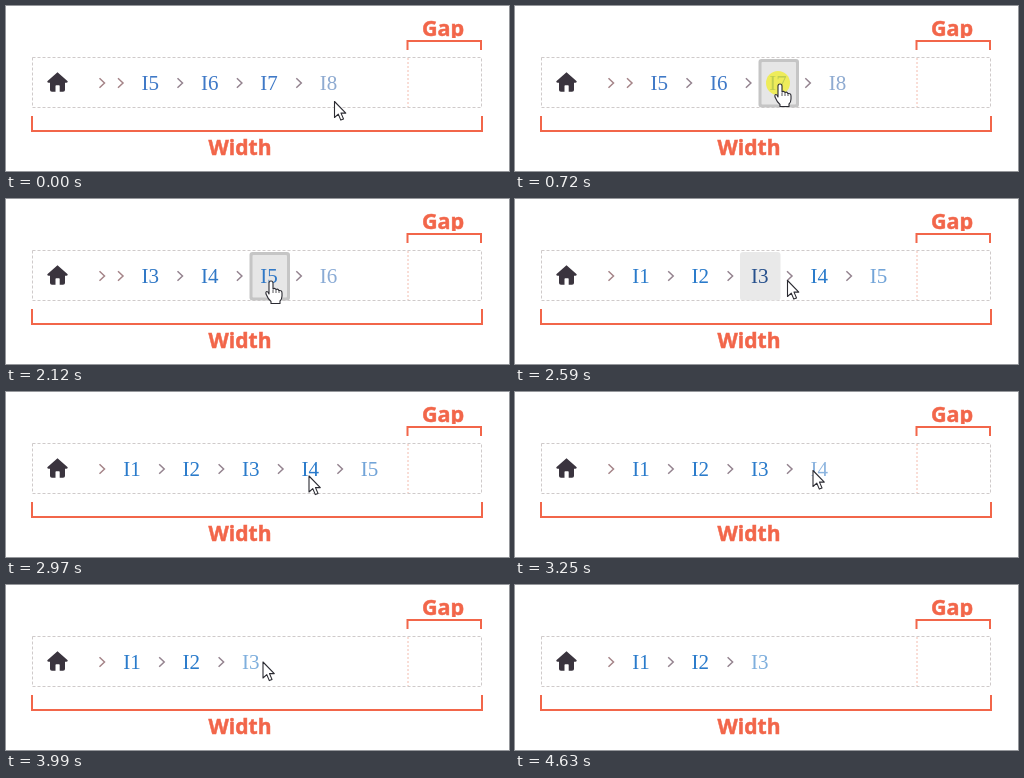
An HTML page with a canvas for the animation above (5200 ms loop, 503 px wide and 165 px high).

```html
<!DOCTYPE html>
<html lang="en">
<head>
<meta charset="utf-8">
<title>Breadcrumb width and gap</title>
<style>
html, body { margin: 0; width: 100%; height: 100%; overflow: hidden; background: #fff; }
canvas { display: block; width: 503px; height: 165px; }
</style>
</head>
<body>
<canvas id="stage"></canvas>
<script>
const W = 503, H = 165, LOOP = 5200, PITCH = 59.4;
const canvas = document.getElementById('stage');
const ctx = canvas.getContext('2d');
const ratio = window.devicePixelRatio || 1;
canvas.width = W * ratio;
canvas.height = H * ratio;

// Visible trail: first item, last item, overflow marker, link and current colours
const trails = [
  [0, 5, 8, true, '#3f79c7', '#8fabd1'],
  [900, 4, 7, true, '#3277c5', '#8fabd1'],
  [1650, 3, 6, true, '#3078c6', '#8aabd5'],
  [2230, 1, 5, false, '#2a7bcb', '#72a4d8'],
  [3150, 1, 4, false, '#2a7bcb', '#8db5df'],
  [3890, 1, 3, false, '#2a7bcb', '#7fafdd']
];

// Pointer position and shape
const moves = [
  [0, 328.5, 95.5, 'arrow'],
  [150, 308, 89, 'arrow'],
  [250, 282, 82, 'arrow'],
  [350, 265, 78, 'hand'],
  [1380, 265, 80, 'hand'],
  [1480, 265, 82, 'hand'],
  [2590, 272.5, 81.5, 'arrow'],
  [2690, 284, 82, 'arrow'],
  [2790, 295, 83, 'arrow'],
  [2880, 303, 84, 'arrow'],
  [2980, 308, 85, 'hand'],
  [3150, 306, 83, 'arrow'],
  [3250, 298, 78.5, 'arrow'],
  [3330, 284, 78, 'arrow'],
  [3430, 270, 77, 'arrow'],
  [3510, 258, 76, 'hand'],
  [3890, 257, 77, 'arrow'],
  [4450, 292, 86, 'arrow'],
  [4540, 364, 97, 'arrow'],
  [4630, 0, 0, 'none']
];

// Button look: slot x, style
const buttons = [
  [0, 0, 'none'],
  [350, 243.5, 'text'],
  [540, 243.5, 'hover'],
  [640, 243.5, 'press'],
  [900, 243.5, 'hover'],
  [1380, 243.5, 'press'],
  [1750, 243.5, 'hover'],
  [2040, 243.5, 'press'],
  [2230, 225, 'hover'],
  [2690, 0, 'none'],
  [2980, 285, 'text'],
  [3150, 0, 'none'],
  [3510, 225, 'hover'],
  [3710, 225, 'press'],
  [3890, 0, 'none']
];

const clicks = [[640, 820], [3710, 3800]];

const at = (list, t) => list.filter(k => k[0] <= t).pop();

function line(points, color, width, dash = []) {
  ctx.beginPath();
  points.forEach(([x, y]) => ctx.lineTo(x, y));
  ctx.strokeStyle = color;
  ctx.lineWidth = width;
  ctx.setLineDash(dash);
  ctx.stroke();
  ctx.setLineDash([]);
}

function label(text, x, y, font, color) {
  ctx.font = font;
  ctx.fillStyle = color;
  ctx.textAlign = 'left';
  ctx.fillText(text, x, y);
}

// Heavy caption centred on x
function caption(text, x, y, size) {
  ctx.font = `bold ${size}px "Noto Sans", "Open Sans", sans-serif`;
  ctx.textAlign = 'center';
  ctx.fillStyle = ctx.strokeStyle = '#f2664a';
  ctx.lineWidth = 0.5;
  ctx.fillText(text, x, y);
  ctx.strokeText(text, x, y);
}

function chevron(x, color) {
  line([[x - 2.5, 72.3], [x + 2.5, 77], [x - 2.5, 81.7]], color, 1.5);
}

function frame() {
  const coral = '#f2664a';
  caption('Gap', 437, 29.5, 21.5);
  ctx.fillStyle = '#fff';
  ctx.fillRect(410, 32, 55, 3);
  caption('Width', 234, 149, 21);
  ctx.setLineDash([3, 2]);
  ctx.strokeStyle = '#cfcaca';
  ctx.lineWidth = 1;
  ctx.strokeRect(26.5, 51.5, 449, 50);
  line([[402, 52], [402, 101]], '#f3bcae', 1, [2, 2]);
  line([[401.5, 44], [401.5, 35], [475, 35], [475, 44]], coral, 2);
  line([[26, 110], [26, 125], [476, 125], [476, 110]], coral, 2);
}

function home() {
  ctx.fillStyle = '#3a343e';
  ctx.fill(new Path2D('M51.5 66.3 L61.7 75.3 Q62 76.7 60.5 76.7 H59 V84 Q59 85.8 57 85.8 H53.7 V80 Q53.7 79.2 53 79.2 H50.2 Q49.5 79.2 49.5 80 V85.8 H46 Q44 85.8 44 84 V76.7 H42.5 Q41 76.7 41.3 75.3 Z'));
}

function button(x, style) {
  if (style === 'none' || style === 'text') return;
  const press = style === 'press';
  ctx.beginPath();
  ctx.roundRect(x, 53, 40.5, 48.5, 3);
  ctx.fillStyle = press ? '#c5c5c5' : '#e9e9e9';
  ctx.fill();
  if (!press) return;
  ctx.beginPath();
  ctx.roundRect(x + 3, 56, 34.5, 42.5, 1);
  ctx.fillStyle = '#e6e6e6';
  ctx.fill();
}

function items([, first, last, more, link, current], [, hoverX, style]) {
  const start = more ? 135.5 : 117.2;
  const dark = style === 'hover' || style === 'text';
  chevron(96, '#a58488');
  if (more) chevron(114.5, '#a58488');
  for (let n = first; n <= last; n++) {
    const x = start + (n - first) * PITCH;
    const hot = dark && Math.abs(x - hoverX - 11) < 4;
    const color = n === last ? current : hot ? '#27508c' : link;
    label('I' + n, x, 84, '21px "Liberation Serif", "Times New Roman", serif', color);
    if (n < last) chevron(x + 38.5, '#94838f');
  }
}

const shapes = {
  arrow: new Path2D('M0 0 V16 L3.8 12.6 L6.3 18.6 L9 17.4 L6.5 11.6 H11.3 Z'),
  hand: new Path2D('M-2 2 Q-2 0 0 0 Q2 0 2 2 V8 Q3.5 6.5 5 8.5 Q7 7.5 8 9.5 Q11 9 11 12 V15 Q11 18 9 20 V22.5 H0 V20.5 Q-3 18 -5 13 Q-5.5 10.5 -4 10.5 Q-3 10.5 -2 13 Z')
};

function pointer([, x, y, kind]) {
  if (kind === 'none') return;
  const ink = '#2b2b32';
  ctx.save();
  ctx.translate(x, y);
  ctx.lineJoin = 'round';
  ctx.lineWidth = 1.1;
  ctx.fillStyle = '#fff';
  ctx.strokeStyle = ink;
  ctx.fill(shapes[kind]);
  ctx.stroke(shapes[kind]);
  if (kind === 'hand') {
    for (const finger of [2, 5, 8]) line([[finger, 9], [finger, 12]], ink, 0.8);
  }
  ctx.restore();
}

function draw(t) {
  ctx.setTransform(ratio, 0, 0, ratio, 0, 0);
  ctx.fillStyle = '#fff';
  ctx.fillRect(0, 0, W, H);
  const look = at(buttons, t), mouse = at(moves, t);
  frame();
  home();
  button(look[1], look[2]);
  items(at(trails, t), look);
  if (clicks.some(([a, b]) => t >= a && t < b)) {
    ctx.fillStyle = 'rgba(241, 238, 36, 0.72)';
    ctx.beginPath();
    ctx.arc(mouse[1] - 2, mouse[2] - 1, 12, 0, Math.PI * 2);
    ctx.fill();
  }
  pointer(mouse);
}

const begin = performance.now();
function tick() {
  draw((performance.now() - begin) % LOOP);
  requestAnimationFrame(tick);
}
tick();
</script>
</body>
</html>
```
